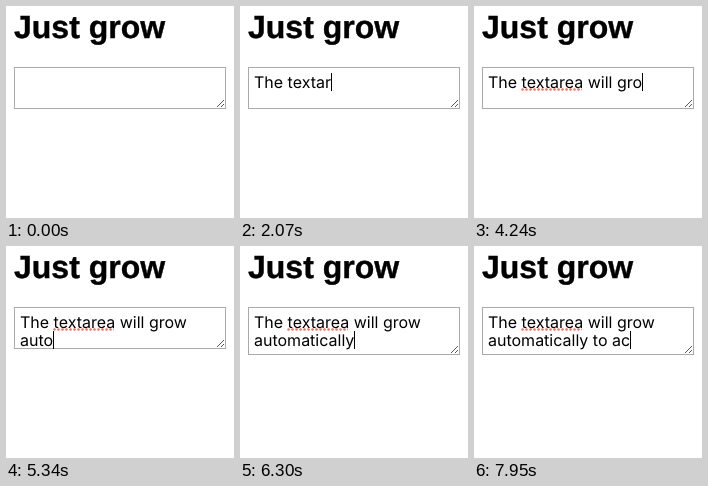
An HTML page that plays this animation: 228 by 212 pixels, repeating every 8 s.

```html
<!DOCTYPE html>
<html lang="en">
<head>
<meta charset="utf-8">
<title>Just grow</title>
<style>
  html, body { margin: 0; width: 100%; height: 100%; overflow: hidden; background: #fff; }
  svg { display: block; width: 228px; height: 212px; }
  text { white-space: pre; fill: #000; text-rendering: geometricPrecision; }
  .title { font: bold 32px "Liberation Sans", Arial, sans-serif; stroke: #000; stroke-width: .4px; }
  .line { font: 16px Inter, Roboto, sans-serif; }
</style>
</head>
<body>
<svg viewBox="0 0 228 212">
  <defs>
    <pattern id="dots" x="47" y="82" width="4" height="3" patternUnits="userSpaceOnUse">
      <circle cx="1.5" cy="1.5" r="1.25" fill="#fa6a54"/>
    </pattern>
  </defs>
  <text class="title" x="8" y="32">Just grow</text>
  <rect id="box" x="8.5" y="61.5" width="211" height="41" fill="#fff" stroke="#a9a9a9"/>
  <path id="grip" d="M211 101L218 94M215 101L218 98" stroke="#555"/>
  <rect id="spell" x="47" y="82" width="61" height="3" fill="url(#dots)"/>
  <text class="line" id="row0" x="14" y="82"></text>
  <text class="line" id="row1" x="14" y="100"></text>
  <rect id="caret" width="1" height="18" fill="#000" shape-rendering="crispEdges"/>
</svg>
<script>
const LOOP = 8000, LEFT = 14, TOP = 67, LINE = 18;
const CARET_ON = 290, SPELL = 2690, GROW = 5370, WRAP = 5280;
const FIRST = "The textarea will grow ";

// Runs of keys: start time, gap between keys, keys ("<" deletes one)
const runs = [
  [830, 110, "The te"], [1620, 0, "x"], [1800, 120, "ta"], [2070, 150, "re"],
  [2420, 0, "a"], [2660, 0, " "], [2830, 120, "wi"], [3100, 120, "ll "],
  [3790, 0, "g"], [4000, 240, "ro"], [4540, 240, "w "], [4920, 0, "a"],
  [5100, 90, "uto"], [5450, 100, "mati"], [5900, 100, "cally"], [6450, 0, " "],
  [6830, 150, "o "], [7250, 120, "<<"], [7480, 100, "to a"], [7950, 0, "c"]
];
const keys = runs.flatMap(([start, gap, chars]) =>
  [...chars].map((key, i) => ({ at: start + i * gap, key })));

const el = id => document.getElementById(id);
const box = el("box"), grip = el("grip"), spell = el("spell"), caret = el("caret");
const rows = [el("row0"), el("row1")];
const show = (node, on) => node.setAttribute("visibility", on ? "visible" : "hidden");

function typed(t) {
  let s = "";
  for (const { at, key } of keys) {
    if (at > t) break;
    s = key === "<" ? s.slice(0, -1) : s + key;
  }
  return s;
}

function draw(t) {
  const s = typed(t), wrapped = t >= WRAP, grown = t >= GROW;
  const lines = wrapped ? [FIRST, s.slice(FIRST.length)] : [s, ""];
  rows.forEach((row, i) => {
    if (row.textContent !== lines[i]) row.textContent = lines[i];
  });
  const n = wrapped ? 1 : 0;
  const width = lines[n] ? rows[n].getComputedTextLength() : 0;
  caret.setAttribute("x", Math.round(LEFT + width));
  caret.setAttribute("y", TOP + n * LINE);
  show(caret, t >= CARET_ON);
  show(spell, t >= SPELL);
  box.setAttribute("height", grown ? 47 : 41);
  grip.setAttribute("transform", `translate(0 ${grown ? 6 : 0})`);
}

const begin = performance.now();
function tick() {
  draw((performance.now() - begin) % LOOP);
  requestAnimationFrame(tick);
}
tick();
</script>
</body>
</html>
```
